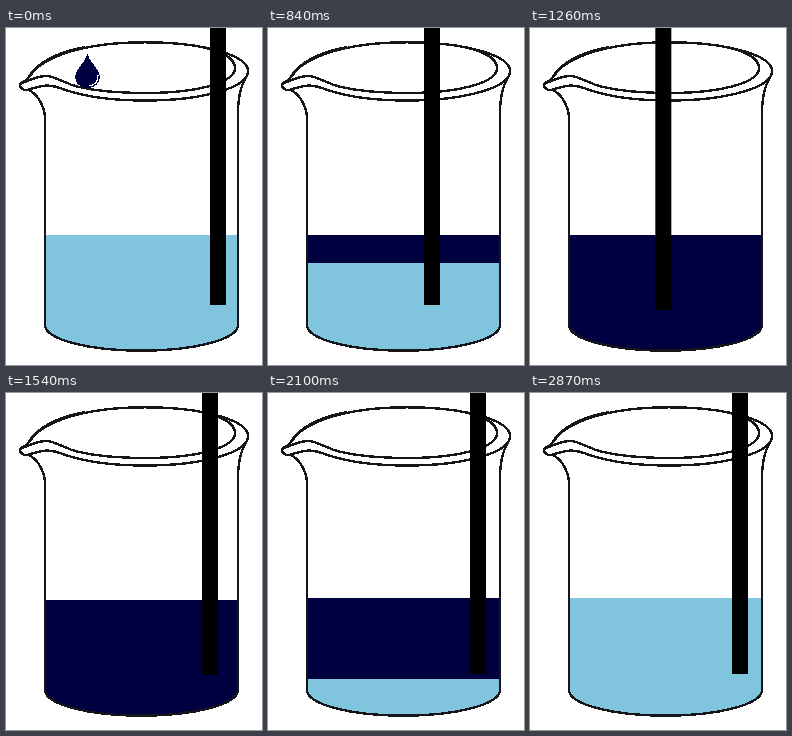
An HTML page without scripts that plays this animation: 256x337 px, repeating every 2.94 s.

```html
<!DOCTYPE html>
<html lang="en">
<head>
<meta charset="utf-8">
<title>Beaker</title>
<style>
html, body { margin: 0; width: 100%; height: 100%; overflow: hidden; background: #fff; }
svg { display: block; width: 256px; height: 337px; shape-rendering: crispEdges; }

.glass { fill: none; stroke: #16161a; stroke-width: 2.4; stroke-linecap: round; stroke-linejoin: round; }
.water { fill: #80c4de; }
.ink { fill: #000040; }

/* 42 poses of 70 ms; the tiny delay keeps samples off the step edges */
.liquid, .layer, .drop, .rod { animation: 2940ms step-end -4ms infinite; }
.liquid { animation-name: level; }
.layer { animation-name: spread; }
.drop { animation-name: fall; }
.rod { animation-name: stir; }

@keyframes level {
  0% { transform: none; }
  54.762%, 100% { transform: translateY(-2px); }
}
@keyframes spread {
  0% { height: 0; }
  16.667% { height: 6px; }
  19.048% { height: 11px; animation-timing-function: steps(4); }
  28.571% { height: 28px; animation-timing-function: steps(3); }
  35.714% { height: 41px; }
  38.095% { height: 120px; }
  57.143% { height: 120px; animation-timing-function: steps(6); }
  71.429% { height: 81px; animation-timing-function: steps(2); }
  76.19% { height: 68px; animation-timing-function: steps(8); }
  95.238% { height: 7px; }
  97.619%, 100% { height: 0; }
}
@keyframes fall {
  0% { transform: none; animation-timing-function: steps(7); }
  16.667% { transform: translate(2px, 155px); }
  19.048% { transform: translate(2px, 177px); }
  21.429%, 100% { transform: translate(2px, 200px); }
}
@keyframes stir {
  0% { transform: none; }
  19.048% { transform: none; animation-timing-function: steps(4); }
  28.571% { transform: translate(-48px, 0); animation-timing-function: steps(3); }
  35.714% { transform: translate(-101px, 3px); }
  38.095% { transform: translate(-114px, 5px); animation-timing-function: steps(6); }
  52.381% { transform: translate(-8px, 5px); }
  54.762%, 100% { transform: translate(-2px, 4px); }
}
</style>
</head>
<body>
<svg viewBox="0 0 256 337">
  <defs>
    <clipPath id="inside"><path d="M39 90V297A96.500 25.700 0 0 0 232 297V90Z"/></clipPath>
    <clipPath id="air"><rect width="256" height="207"/></clipPath>
  </defs>

  <g clip-path="url(#inside)">
    <g class="liquid">
      <rect class="water" x="39" y="207" width="193" height="125"/>
      <rect class="ink layer" x="39" y="207" width="193" height="0"/>
    </g>
  </g>

  <g class="glass">
    <!-- rim and spout, heavier at the upper left -->
    <path d="M23 61.500C17 63 14 60 14 56.500C16 53 20 54 23 49C37 27 82 14.300 139 14.300C196 14.300 242 27 242 43C242 60 196 72.500 139 72.500C104 72.500 78 68.500 58 61.500C43 55.500 37 57 23 61.500"/>
    <path d="M16 55C27 51 36 46 46 49C56 52 60 56 73 59C91 63 112 65 139 65C190 65 229 55 229 40C229 31 217 24 200 20"/>
    <path d="M23 49C32 35 52 24.500 78 19.500" stroke-width="3"/>
    <!-- body -->
    <path d="M24 62.500C33 68 39 80 39 91V297A96.500 25.700 0 0 0 232 297V86C232 70 234 59 240 50"/>
  </g>

  <g clip-path="url(#air)">
    <g class="drop">
      <path class="ink" d="M81.500 26C83 34 94 41 94 49C94 56 88 60 81.500 60C75 60 69 56 69 49C69 41 80 34 81.500 26Z"/>
      <path d="M92 47C92.500 53 89 57 83 58" fill="none" stroke="#fff" stroke-width="1.2"/>
    </g>
  </g>

  <rect class="rod" x="204" y="-20" width="16" height="297"/>
</svg>
</body>
</html>
```
